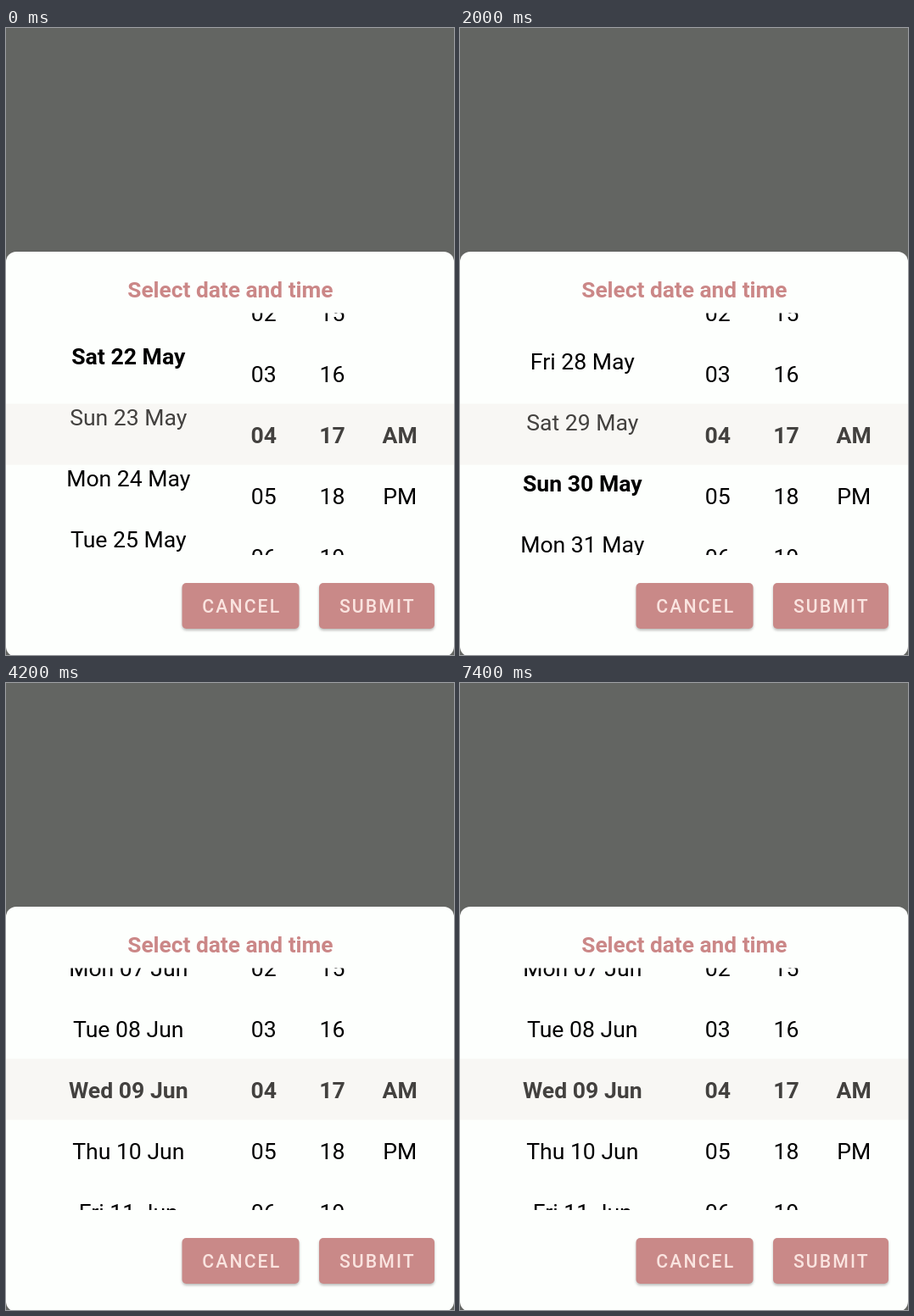
These frames come from a looping animation (528x740 px, 8 s). An HTML page:

```html
<!DOCTYPE html>
<html lang="en">
<head>
<meta charset="utf-8">
<title>Date and time picker</title>
<style>
  html, body { margin: 0; width: 100%; height: 100%; overflow: hidden; background: #636562; }
  svg { display: block; width: 528px; height: 740px; font: 26.6px Roboto, sans-serif; }
  text { text-anchor: middle; white-space: pre; }
  .title { font-size: 26.3px; font-weight: 700; fill: #cb8787; }
  .bold { font-weight: 700; }
  .button { fill: #c98988; filter: drop-shadow(0 2px 1.5px rgba(0, 0, 0, .26)); }
  .label { font-size: 21.2px; font-weight: 500; letter-spacing: 2.1px; fill: #fae4e0; }
</style>
</head>
<body>
<svg viewBox="0 0 528 740">
  <defs>
    <clipPath id="view"><rect y="336.5" width="528" height="285.5"/></clipPath>
  </defs>
  <rect width="528" height="740" fill="#636562"/>
  <rect y="264" width="528" height="478" rx="12" fill="#fdfffd"/>
  <text class="title" x="264.4" y="317.5">Select date and time</text>
  <g id="wheels" clip-path="url(#view)"></g>
  <rect y="443.5" width="528" height="72" fill="rgb(235,226,220)" fill-opacity=".285"/>
  <rect class="button" x="207.5" y="655" width="138" height="54" rx="5"/>
  <rect class="button" x="369" y="655" width="136" height="54" rx="5"/>
  <text class="label" x="277.8" y="690.3">CANCEL</text>
  <text class="label" x="437.8" y="690.3">SUBMIT</text>
</svg>
<script>
const LOOP = 8000, TICK = 100, ROW = 72, BASELINE = 490.3, SLOTS = 7;
const DAYS = ['Fri', 'Sat', 'Sun', 'Mon', 'Tue', 'Wed', 'Thu'];
const pad = n => String(n).padStart(2, '0');

// Days count on from 1 May.
const dateLabel = d => `${DAYS[d % 7]} ${d > 31 ? pad(d - 31) + ' Jun' : pad(d) + ' May'}`;
const hourLabel = h => pad((h + 11) % 12 + 1);
const halfLabel = i => ['AM', 'PM'][i] || '';

// Each move: [start ms, end ms, from row, to row], slowing towards its end.
const wheels = [
  { x: 144.3, label: dateLabel, rest: 22, moves: [
    [0, 500, 23.3, 27],
    [1100, 1300, 28.2, 30],
    [2000, 2300, 29.21, 28],
    [2700, 2800, 29.3, 30.88],
    [2800, 3200, 30.88, 34],
    [3800, 4200, 35.69, 40]
  ] },
  { x: 303.7, label: hourLabel, rest: 4, moves: [
    [5200, 5600, 4.9, 8.52],
    [6000, 6600, 8.2, 7],
    [7200, 7400, 6.2, 4]
  ] },
  { x: 384.4, label: pad, rest: 17, moves: [] },
  { x: 464.2, label: halfLabel, rest: 0, moves: [] }
];

const group = document.getElementById('wheels');
for (const wheel of wheels) {
  wheel.slots = Array.from({ length: SLOTS }, () => {
    const el = document.createElementNS('http://www.w3.org/2000/svg', 'text');
    el.setAttribute('x', wheel.x);
    return group.appendChild(el);
  });
}

// The bold row changes only once the wheel settles on a whole row.
function stateAt({ rest, moves }, t) {
  let row = rest, bold = rest;
  for (const [start, end, from, to] of moves) {
    if (t < start) break;
    const left = 1 - Math.min(1, (t - start) / (end - start));
    row = to + (from - to) * left ** 2;
    if (!left && Number.isInteger(to)) bold = to;
  }
  return { row, bold };
}

function drawWheel(wheel, t) {
  const { row, bold } = stateAt(wheel, t);
  const first = Math.round(row) - (SLOTS >> 1);
  wheel.slots.forEach((el, i) => {
    const n = first + i;
    el.textContent = wheel.label(n);
    el.setAttribute('y', BASELINE + (n - row) * ROW);
    el.setAttribute('class', n === bold ? 'bold' : '');
  });
}

const origin = performance.now();
let shown = -1;
function frame() {
  const t = Math.floor((performance.now() - origin) % LOOP / TICK) * TICK;
  if (t !== shown) {
    shown = t;
    wheels.forEach(wheel => drawWheel(wheel, t));
  }
  requestAnimationFrame(frame);
}
frame();
</script>
</body>
</html>
```
